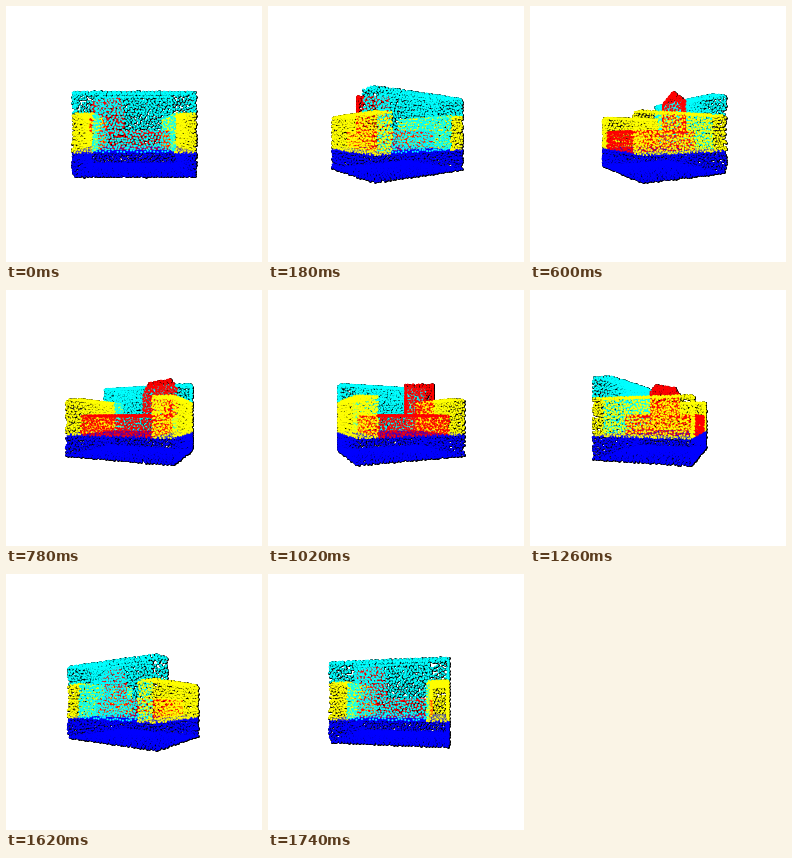
Animation of 256 by 256 pixels, one loop 1800 ms. Source, as a matplotlib script:

```python
import numpy as np
import matplotlib.pyplot as plt
from matplotlib.animation import FuncAnimation

SIZE, DPI = 256, 100
FRAMES, STEP = 30, 60
DIST, FOCAL = 6.4, 221.7      # camera distance, focal length in pixels
GAP = 0.08                    # spacing of the surface samples

BLUE, YELLOW, CYAN, RED = (0, 0, 1), (1, 1, 0), (0, 1, 1), (1, 0, 0)
W, D = 1.45, 1.2              # half width and half depth
SEAT, ARM, INNER = -0.44, 0.49, 0.97

rng = np.random.default_rng(4)


def quad(a, b, c, d):
    """Points on the patch a-b / c-d, in staggered rows with some jitter."""
    a, b, c, d = (np.asarray(p, float) for p in (a, b, c, d))
    len_u = (np.linalg.norm(b - a) + np.linalg.norm(d - c)) / 2
    len_v = (np.linalg.norm(c - a) + np.linalg.norm(d - b)) / 2
    nu, nv = max(1, round(len_u / GAP)), max(1, round(len_v / GAP))
    u, v = np.meshgrid(np.arange(nu), np.arange(nv))
    u = (u + v % 2 / 2 + rng.uniform(-0.3, 0.3, u.shape)) % nu / nu
    v = (v + 0.5 + rng.uniform(-0.4, 0.4, v.shape)) / nv
    u, v = u.reshape(-1, 1), v.reshape(-1, 1)
    return (1 - v) * ((1 - u) * a + u * b) + v * ((1 - u) * c + u * d)


def box(x0, x1, y0, y1, z0, z1, skip=()):
    """Sampled box surface; skip names faces such as 'y0' that are left open."""
    faces = []
    for name, x in (("x0", x0), ("x1", x1)):
        if name not in skip:
            faces.append(quad((x, y0, z0), (x, y0, z1), (x, y1, z0), (x, y1, z1)))
    for name, y in (("y0", y0), ("y1", y1)):
        if name not in skip:
            faces.append(quad((x0, y, z0), (x1, y, z0), (x0, y, z1), (x1, y, z1)))
    for name, z in (("z0", z0), ("z1", z1)):
        if name not in skip:
            faces.append(quad((x0, y0, z), (x1, y0, z), (x0, y1, z), (x1, y1, z)))
    return np.vstack(faces)


def pillow(cx, cz, length):
    """Upright pillow with a ridged top, turned 30 degrees."""
    profile = [(-0.26, 0.06), (-0.26, 0.74), (-0.03, 1.02), (0.27, 0.82), (0.27, 0.06)]
    ca, sa = np.cos(np.pi / 6), np.sin(np.pi / 6)

    def at(k, t):
        n, y = profile[k % 5]
        return cx + t * ca - n * sa, y, cz + t * sa + n * ca

    h = length / 2
    faces = [quad(at(k, -h), at(k, h), at(k + 1, -h), at(k + 1, h)) for k in range(5)]
    for t in (-h, h):
        faces.append(quad(at(0, t), at(4, t), at(1, t), at(3, t)))
        faces.append(quad(at(1, t), at(3, t), at(2, t), at(2, t)))
    return np.vstack(faces)


parts = [
    (BLUE, box(-W, W, -1, SEAT, -D, D)),
    (YELLOW, box(-W, -INNER, SEAT, ARM, -D, D)),
    (YELLOW, box(INNER, W, SEAT, ARM, -D, D)),
    (CYAN, box(-W, W, ARM, 1, 0.72, D, skip=("y0",))),
    (CYAN, box(-INNER, INNER, ARM, 0.96, 0.58, 0.72, skip=("y0", "z1"))),
    (CYAN, box(-INNER, INNER, SEAT, ARM, 0.58, D, skip=("y0", "y1"))),
    (RED, box(-INNER, INNER, SEAT, 0.06, -D, 0.56)),
    (RED, pillow(-0.77, 0.01, 0.82)),
]
points = np.vstack([p for _, p in parts])
colors = np.vstack([np.tile(c, (len(p), 1)) for c, p in parts])


def area(px):
    return (px * 72 / DPI) ** 2


fig = plt.figure(figsize=(SIZE / DPI, SIZE / DPI), dpi=DPI, facecolor="white")
ax = fig.add_axes([0, 0, 1, 1])
ax.set_xlim(0, SIZE)
ax.set_ylim(SIZE, 0)
ax.axis("off")
rims = ax.scatter(points[:, 0], points[:, 1], s=area(3.0), c="black",
                  linewidths=0, antialiased=False)
dots = ax.scatter(points[:, 0], points[:, 1], s=area(2.05), c=colors, linewidths=0)


def update(i):
    t = 2 * np.pi * i / FRAMES
    x, y, z = points.T
    depth = z * np.cos(t) - x * np.sin(t)
    scale = FOCAL / (DIST - depth)
    px = SIZE / 2 + scale * (x * np.cos(t) + z * np.sin(t))
    py = SIZE / 2 - scale * y
    order = np.argsort(depth)
    spots = np.column_stack([px, py])[order]
    rims.set_offsets(spots)
    dots.set_offsets(spots)
    dots.set_facecolor(colors[order])
    return rims, dots


anim = FuncAnimation(fig, update, frames=FRAMES, interval=STEP, repeat=True,
                     repeat_delay=0, blit=False)
plt.show()
```
